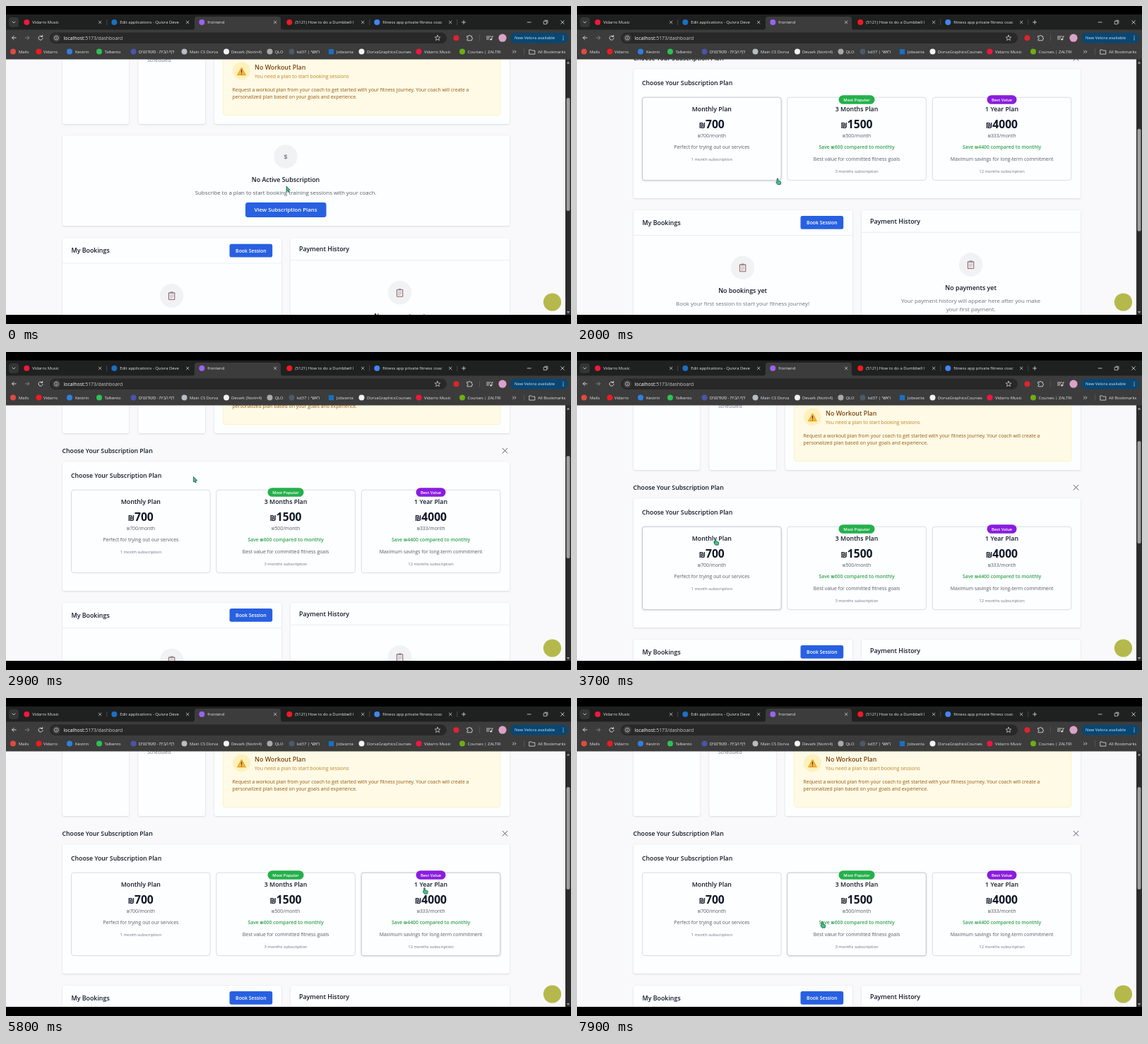
These frames come from a looping animation (800 px wide and 450 px high, 8000 ms). An HTML page:

```html
<!DOCTYPE html>
<html lang="en">
<head>
<meta charset="utf-8">
<title>Dashboard</title>
<style>
  html, body { margin: 0; width: 100%; height: 100%; overflow: hidden; background: #000; }
  svg { display: block; width: 800px; height: 450px; font-family: "Open Sans", "Noto Sans", sans-serif; }
  text { white-space: pre; }
</style>
</head>
<body>
<svg id="stage" viewBox="0 0 800 450" xmlns="http://www.w3.org/2000/svg"></svg>
<script>
const LOOP = 8000;
const NOTCH = 52;
const INK = '#111827', GRAY = '#555c66', BLUE = '#2860e1', GREEN = '#2fa24f';

// Drawing helpers
const text = (x, y, s, size, fill, weight = 400, anchor = 'start') =>
  `<text x="${x}" y="${y}" font-size="${size}" fill="${fill}" font-weight="${weight}" text-anchor="${anchor}">${s}</text>`;
const mid = (x, y, s, size, fill, weight) => text(x, y, s, size, fill, weight, 'middle');
const rect = (x, y, w, h, fill, r = 0, more = '') =>
  `<rect x="${x}" y="${y}" width="${w}" height="${h}" rx="${r}" fill="${fill}" ${more}/>`;
const dot = (x, y, r, fill, more = '') => `<circle cx="${x}" cy="${y}" r="${r}" fill="${fill}" ${more}/>`;
const line = (d, color, width = 0.8) =>
  `<path d="${d}" fill="none" stroke="${color}" stroke-width="${width}" stroke-linecap="round" stroke-linejoin="round"/>`;
const cross = (x, y, r, color, width) =>
  line(`M${x - r} ${y - r}l${2 * r} ${2 * r}m0 ${-2 * r}l${-2 * r} ${2 * r}`, color, width);
const panel = (x, y, w, h) => rect(x, y, w, h, '#fdfeff', 3.5, 'filter="url(#soft)"');

function clipboard(x, y) {
  return dot(x, y, 16.7, '#f1f2f4') +
    rect(x - 4.7, y - 4.8, 9.4, 10.8, '#a9664b', 1) +
    rect(x - 3.6, y - 3.6, 7.2, 8.6, '#eef0f8', 0.3) +
    rect(x - 2.2, y - 5.8, 4.4, 2.7, '#8793a3', 0.8) +
    line(`M${x - 2.3} ${y - 1}h4.6m-4.6 2h4.6m-4.6 2h3`, '#8e9bc0', 0.7);
}

// Page sections
function topCards() {
  return panel(80, 40, 94, 127) + panel(187.5, 40, 94.5, 127) + panel(295, 40, 418, 127) +
    text(200, 78.5, 'Scheduled', 6.9, '#6b7280') +
    rect(307.5, 50, 392.5, 104.5, '#fefae6', 3.5, 'stroke="#fbefb0" stroke-width=".7"') +
    dot(333.5, 92, 12.5, '#fef1bd') +
    '<path d="M333.5 87.3l5.8 10.4h-11.6z" fill="#f6b73c" stroke="#e9a32c" stroke-width="1.2" stroke-linejoin="round"/>' +
    line('M333.5 90.6v3.4m0 2.2v.1', '#4a3418', 1.2) +
    text(352, 90, 'No Workout Plan', 8.85, '#7a4512', 600) +
    text(352, 102.4, 'You need a plan to start booking sessions', 6.93, '#bf8420') +
    text(320.5, 120.9, 'Request a workout plan from your coach to get started with your fitness journey. Your coach will create a', 6.9, '#94580f') +
    text(320.5, 131.2, 'personalized plan based on your goals and experience.', 6.9, '#94580f');
}

function emptyPlan() {
  return panel(80, 183.5, 633, 127.5) +
    dot(396, 213, 16.7, '#f1f2f4') + mid(396, 216.6, '$', 9.6, '#83888f', 700) +
    mid(396, 249, 'No Active Subscription', 8.85, INK, 600) +
    mid(396, 266.8, 'Subscribe to a plan to start booking training sessions with your coach.', 7.91, GRAY) +
    rect(339, 278, 114.5, 21, BLUE, 3.5, 'id="viewBtn"') +
    mid(396, 291.4, 'View Subscription Plans', 7.8, '#fff', 600);
}

const plans = [
  { x: 92.5, name: 'Monthly Plan', price: 700, rate: 700, note: 'Perfect for trying out our services', term: '1 month' },
  { x: 297.75, name: '3 Months Plan', price: 1500, rate: 500, save: 600, note: 'Best value for committed fitness goals', term: '3 months', tag: 'Most Popular', color: '#25b04c', tagW: 51 },
  { x: 503.25, name: '1 Year Plan', price: 4000, rate: 333, save: 4400, note: 'Maximum savings for long-term commitment', term: '12 months', tag: 'Best Value', color: '#8a1ddd', tagW: 42 },
];
const PLAN = { y: 247.2, w: 196.6, h: 117.4 };

function planCard(p, i) {
  const c = p.x + PLAN.w / 2;
  const drop = p.save ? 16.7 : 0;
  return rect(p.x, PLAN.y, PLAN.w, PLAN.h, '#fdfeff', 3.5, `id="plan${i}" stroke="#d9dce1"`) +
    (p.tag ? rect(c - p.tagW / 2, 244.2, p.tagW, 12.6, p.color, 6.3) + mid(c, 252.6, p.tag, 5.8, '#fff', 600) : '') +
    mid(c, 266.6, p.name, 8.8, INK, 600) +
    mid(c, 290.5, `<tspan font-size="10">₪</tspan>${p.price}`, 15.7, INK, 700) +
    mid(c, 303.7, `<tspan font-size="5.6">₪</tspan>${p.rate}/month`, 6.9, GRAY) +
    (p.save ? mid(c, 320.4, `Save <tspan font-size="5.6">₪</tspan>${p.save} compared to monthly`, 6.85, GREEN, 600) : '') +
    mid(c, 320.4 + drop, p.note, 6.9, GRAY) +
    mid(c, 337.4 + drop, `${p.term} subscription`, 5.87, '#6b7280');
}

function planPicker() {
  const title = 'Choose Your Subscription Plan';
  return text(79.5, 195, title, 8.72, INK, 600) + cross(706.5, 191.7, 3.4, '#555c66', 1) +
    panel(80, 207.3, 633, 182.7) + text(92, 230.3, title, 8.72, INK, 600) +
    plans.map(planCard).join('');
}

function lowerCards() {
  const y = 328.7;
  return panel(80, y, 310, 210) + panel(403, y, 310, 210) +
    text(92.5, y + 20.7, 'My Bookings', 8.85, INK, 600) +
    rect(316.5, y + 8, 60.7, 18.8, BLUE, 2.8) + mid(346.8, y + 20.3, 'Book Session', 6.85, '#fff', 600) +
    rect(80, y + 35, 310, 0.7, '#e3e5e9') +
    clipboard(234.6, y + 81.3) +
    mid(234.6, y + 117.3, 'No bookings yet', 8.85, INK, 600) +
    mid(234.6, y + 135, 'Book your first session to start your fitness journey!', 7.88, '#6b7280') +
    rect(207, y + 150.3, 55.2, 20.7, BLUE, 2.8) + mid(234.6, y + 163.6, 'Book Now', 7.85, '#fff', 600) +
    text(415, y + 18.7, 'Payment History', 8.85, INK, 600) +
    rect(403, y + 30.8, 310, 0.7, '#e3e5e9') +
    clipboard(557.6, y + 77) +
    mid(557.6, y + 113, 'No payments yet', 8.85, INK, 600) +
    mid(557.6, y + 130.7, 'Your payment history will appear here after you make', 7.88, '#6b7280') +
    mid(557.6, y + 143.2, 'your first payment.', 7.88, '#6b7280');
}

// Browser window
const BAR = '#3c3c3c', PALE = '#e3e3e3';
const tabs = [
  ['Vidarro Music', '#f0183c'],
  ['Edit applications - Quivra Deve', '#1b6fc4'],
  ['frontend', '#9b62f5'],
  ['(5121) How to do a Dumbbell I', '#f01a22'],
  ['fitness app private fitness coac', '#4285f4'],
];
const marks = [
  [10, 18, 'Mails', '#e04a3f'], [46.5, 53, 'Vidarro', '#f01a22'], [90, 98, 'Kestrin', '#2f7fe0'],
  [132, 139.5, 'Talkento', '#2bc254'], [180.5, 188, 'דף הבית - סטודנטים', '#4a55a8'],
  [252.5, 260, 'Main CS Dorva', '#b9bcc0'], [312, 319, 'Devark (Norin4)', '#f2f2f2'],
  [373.5, 380.5, 'QLO', '#a9a9a9'], [404.5, 412, 'kd37 | ראשי', '#4c5a68'],
  [460.5, 468, 'Jobvanta', '#1a70c0'], [503.5, 511, 'DorvaGraphicsCourses', '#f2f2f2'],
  [584.5, 592, 'Vidarro Music', '#f0183c'], [646, 653.5, 'Courses | ZALTRI', '#6fae12'],
];

function browser() {
  let s = rect(0, 0, 800, 12, '#000') + rect(0, 437, 800, 13, '#000') +
    rect(0, 12, 800, 22, '#1f2020') + rect(0, 33.5, 800, 42, BAR) +
    rect(4, 16, 14, 14, '#343535', 4) + line('M9 22l2 2 2-2', PALE) +
    `<path d="M263 34q4 0 4-4v-11q0-4 4-4h114q4 0 4 4v11q0 4 4 4z" fill="${BAR}"/>`;
  tabs.forEach(([name, color], i) => {
    const x = 19 + 124 * i;
    s += dot(x + 10.3, 23, 4, color) +
      `<g clip-path="url(#tab${i})">${text(x + 18.2, 25.2, name, 5.9, PALE)}</g>` +
      cross(x + 114.2, 23, 1.8, '#d0d0d0', 0.8);
    if (i === 0 || i > 2) s += rect(x + 123.5, 19, 0.7, 8, '#55575a');
  });
  s += line('M645.6 23h5m-2.5-2.5v5', PALE) + line('M738.2 23h5', PALE) +
    line('M761.6 21.6h4v4h-4zm1.3-1.3h4v4', PALE, 0.7) + cross(788, 23, 2.3, PALE, 0.8);

  s += line('M14.2 45h-5.6m2.5-2.5l-2.5 2.5 2.5 2.5', PALE, 0.9) +
    line('M27.3 45h5.6m-2.5-2.5l2.5 2.5-2.5 2.5', '#8a8a8a', 0.9) +
    line('M51.3 43.2a3 3 0 1 0 .7 2.4m-.3-4.1v2h-2', PALE, 0.9) +
    rect(62, 37.4, 562, 15.6, '#282828', 7.8) + dot(71.3, 45.2, 5.7, BAR) +
    dot(71.3, 45.2, 2.9, 'none', 'stroke="#d8d8d8" stroke-width=".7"') + line('M71.3 45v1.6m0-3v.1', '#d8d8d8', 0.7) +
    text(81.5, 47.7, 'localhost<tspan fill="#c9c9c9">:5173/dashboard</tspan>', 6.9, '#fff') +
    line('M611 41.4l1.1 2.5 2.7.2-2.1 1.8.7 2.7-2.4-1.5-2.4 1.5.7-2.7-2.1-1.8 2.7-.2z', PALE, 0.7) +
    dot(637.5, 45.2, 4, '#e0232e') +
    line('M653 42.6h2a1.2 1.2 0 0 1 2.4 0h2v2.2a1.2 1.2 0 0 1 0 2.4v1.6h-6.4v-2a1.2 1.2 0 0 0 0-2.4z', PALE) +
    rect(670, 41, 0.7, 8.5, '#5c5e61') +
    line('M680.5 43h6m-6 2h4m-4 2h3m4.5.2v-4.2h1.5', PALE) + dot(686.6, 47.3, 1.2, PALE) +
    dot(703, 45.2, 5.6, '#d9a3c6') +
    rect(714, 38, 82, 14.4, '#0a4672', 7.2) + text(720, 47.3, 'New Velora available', 5.95, '#c9e8ff') +
    [42.6, 45.2, 47.8].map(y => dot(789, y, 0.7, '#c9e8ff')).join('');

  marks.forEach(([icon, x, name, color]) => {
    s += (name === 'Jobvanta' ? rect(icon - 3.6, 61, 7.2, 7.2, color) : dot(icon, 64.6, 4, color)) +
      text(x, 66.8, name, 5.9, PALE);
  });
  return s + line('M717.5 63l1.7 1.7-1.7 1.7m2.8-3.4l1.7 1.7-1.7 1.7', PALE) + rect(733, 60, 0.7, 9, '#5c5e61') +
    line('M741.2 62h2.6l1 1.1h4v5h-7.6z', PALE) + text(753, 66.8, 'All Bookmarks', 5.9, PALE);
}

function defs() {
  const clips = tabs.map((_, i) =>
    `<clipPath id="tab${i}">${rect(19 + 124 * i, 12, 109, 22, '#000')}</clipPath>`).join('');
  return `<defs>
    <filter id="soft" x="-5%" y="-10%" width="110%" height="125%">
      <feDropShadow dx="0" dy=".7" stdDeviation="1" flood-color="#30343c" flood-opacity=".2"/></filter>
    <clipPath id="view">${rect(0, 75, 792, 362, '#000')}</clipPath>${clips}</defs>`;
}

const stage = document.getElementById('stage');
stage.innerHTML = defs() +
  rect(0, 75, 792, 362, '#f9f9fb') +
  `<g clip-path="url(#view)"><g id="page">${topCards()}
    <g id="empty">${emptyPlan()}</g><g id="picker">${planPicker()}</g><g id="lower">${lowerCards()}</g></g></g>` +
  rect(792, 75, 8, 362, '#2c2c2c') +
  '<path d="M793.8 81.5l2.2-3 2.2 3zM793.8 432l2.2 3 2.2-3z" fill="#a0a0a0"/>' +
  rect(793.5, 130, 5, 160, '#9f9f9f', 2.5, 'id="thumb"') +
  dot(773.5, 419, 12.6, '#b5b94c') + browser() +
  `<g id="cursor" fill="#43c487" stroke="#17493a" stroke-width=".7" stroke-linejoin="round">
    <path id="arrow" d="M0 0l5.3 5.4-2.5.2 1.2 2.4-1.3.6-1.1-2.4-1.6 1.5z"/>
    <path id="hand" d="M0 0q1 0 1 1v2.6l3 .7q1 .3.8 1.4l-.7 3h-4.1l-2.3-3.1q.1-1.1 1.4-.3V1q0-1 .9-1z"/></g>`;

const el = id => document.getElementById(id);
const show = (id, on) => el(id).setAttribute('display', on ? 'inline' : 'none');

// Timeline: [time, values...]
const OPEN_AT = 1200;
const path = [
  [0, 397, 255], [100, 397, 255], [600, 388.5, 287.5], [1300, 388.5, 287.5],
  [2000, 284, 244], [2400, 284, 244], [2800, 265.5, 176.5], [3000, 265.5, 176.5],
  [3600, 196, 264.5], [4100, 196, 264.5], [4800, 385, 290], [5000, 390, 288],
  [5600, 592.5, 268.5], [6300, 592.5, 268.5], [7000, 400, 305], [7600, 347, 316.5], [LOOP, 347, 316.5],
];
const scrolls = [
  [0, 0], [1500, 0], [1650, 1], [1750, 1], [1900, 2], [1950, 2], [2100, 3],
  [2450, 3], [2600, 2], [2700, 2], [2850, 1], [3050, 1], [3200, 0], [LOOP, 0],
];

function at(keys, t) {
  const i = Math.max(1, keys.findIndex(k => k[0] > t));
  const a = keys[i - 1], b = keys[i];
  const u = (t - a[0]) / (b[0] - a[0]);
  const e = u * u * (3 - 2 * u);
  return a.slice(1).map((v, n) => v + (b[n + 1] - v) * e);
}
const inside = (x, y, bx, by, w, h) => x >= bx && x <= bx + w && y >= by && y <= by + h;

function draw(t) {
  const [x, y] = at(path, t);
  const scroll = at(scrolls, t)[0] * NOTCH;
  const open = t >= OPEN_AT;
  const py = y + scroll;

  show('empty', !open);
  show('picker', open);
  el('page').setAttribute('transform', `translate(0 ${-scroll})`);
  el('lower').setAttribute('transform', `translate(0 ${open ? 78.3 : 0})`);
  el('thumb').setAttribute('y', open ? 126 + scroll * 0.404 : 130);
  el('thumb').setAttribute('height', open ? 145 : 160);

  let hover = !open && inside(x, py, 339, 278, 114.5, 21);
  el('viewBtn').setAttribute('fill', hover ? '#2049cb' : BLUE);
  plans.forEach((p, i) => {
    const on = open && inside(x, py, p.x, PLAN.y, PLAN.w, PLAN.h);
    el('plan' + i).setAttribute('stroke', on ? '#c3c7ce' : '#d9dce1');
    el('plan' + i).setAttribute('filter', on ? 'url(#soft)' : 'none');
    hover = hover || on;
  });

  el('cursor').setAttribute('transform', `translate(${x} ${y})`);
  show('arrow', !hover);
  show('hand', hover);
}

function tick() {
  draw(performance.now() % LOOP);
  requestAnimationFrame(tick);
}
tick();
</script>
</body>
</html>
```
